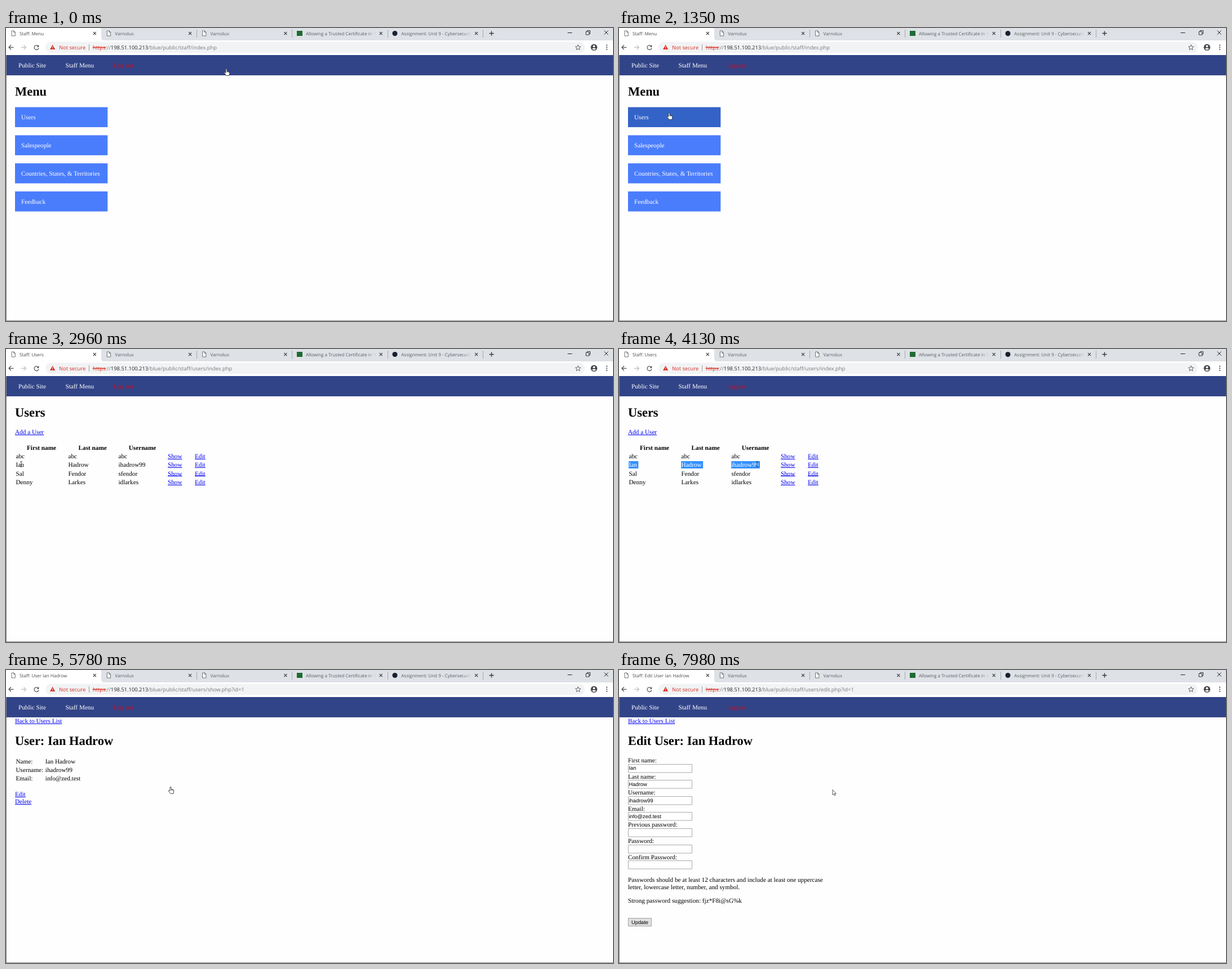
Recreate the animation shown at these times as an HTML page with a canvas. Size 1077 by 520 pixels, loop 8000 ms.

```html
<!DOCTYPE html>
<html lang="en">
<head>
<meta charset="utf-8">
<title>Staff area</title>
<style>
  html, body { margin: 0; width: 100%; height: 100%; overflow: hidden; background: #fff; }
  canvas { display: block; }
</style>
</head>
<body>
<canvas id="stage" width="1077" height="520"></canvas>
<script>
const ctx = document.getElementById('stage').getContext('2d');
ctx.textRendering = 'geometricPrecision';

const LOOP = 8000;
const SERIF = '11.22px "Liberation Serif", serif';
const BOLD = 'bold ' + SERIF;
const HEADING = 'bold 22.44px "Liberation Serif", serif';
const FIELD = '9.35px "Liberation Sans", sans-serif';
const TAB = '8.05px "Open Sans", sans-serif';
const ADDRESS = '9.35px "Open Sans", sans-serif';
const LINK = '#0000ee', STRIP = '#dee1e6', SELECTION = '#3390ff';

const FIRST = 'Ian', LAST = 'Hadrow', LOGIN = 'ihadrow99', MAIL = 'info@zed.test';
const FULL = `${FIRST} ${LAST}`;

// ---------- drawing helpers ----------
function box(x, y, w, h, color) {
  ctx.fillStyle = color;
  ctx.fillRect(x, y, w, h);
}

function text(str, x, y, { font = SERIF, color = '#000', align = 'left' } = {}) {
  ctx.font = font;
  ctx.fillStyle = color;
  ctx.textAlign = align;
  ctx.fillText(str, x, y);
  return ctx.measureText(str).width;
}

function link(str, x, y, color = LINK) {
  const width = text(str, x, y, { color });
  box(x, Math.round(y + 0.7), width, 1, LINK);
}

function shape(d, x, y, { stroke, fill, width = 1 }) {
  const path = new Path2D(d);
  ctx.save();
  ctx.translate(x, y);
  ctx.lineJoin = 'round';
  if (fill) { ctx.fillStyle = fill; ctx.fill(path); }
  if (stroke) { ctx.strokeStyle = stroke; ctx.lineWidth = width; ctx.stroke(path); }
  ctx.restore();
}

function disc(x, y, r, color) {
  ctx.fillStyle = color;
  ctx.beginPath();
  ctx.arc(x, y, r, 0, 7);
  ctx.fill();
}

const cross = r => `M${-r},${-r}L${r},${r}M${r},${-r}L${-r},${r}`;

// ---------- browser window ----------
function fileIcon(x) {
  shape('M-3,-4.5H1L3.3,-2V4.5H-3ZM.8,-4.5V-1.8H3.3', x, 9.5, { stroke: '#5f6368', fill: '#fff', width: 0.9 });
}

function fade(x) {
  const gradient = ctx.createLinearGradient(x - 16, 0, x, 0);
  gradient.addColorStop(0, STRIP + '00');
  gradient.addColorStop(1, STRIP);
  box(x - 16, 2, 40, 16, gradient);
}

function drawTabs(title, loading) {
  box(0, 0, 1077, 22, STRIP);
  shape('M0,0H167Q169,0 169,3V17Q169,22 174,22H0Z', 0, 0, { fill: '#fff' });
  const titles = [title, 'Varnolux', 'Varnolux', 'Allowing a Trusted Certificate in Yo', 'Assignment: Unit 9 - Cybersecurity'];
  titles.forEach((label, i) => {
    const x = i * 169.3;
    text(label, x + 24, 12.5, { font: TAB, color: i ? '#5a5e63' : '#45494d' });
    if (i > 2) fade(x + 149);
    shape(cross(2.5), x + 157.3, 9.5, { stroke: '#45494d', width: 1.1 });
    if (i) box(Math.round(x + 168.6), 3, 1, 14, '#a5a8ad');
    if (i < 3 && !(loading && i === 0)) fileIcon(x + 13);
  });
  if (loading) box(12, 5, 2, 1, '#777');
  box(516, 5, 10, 9, '#1d6b34');
  disc(690, 9.5, 4.5, '#17212f');
  shape('M-4,0H4M0,-4V4', 861.5, 9.5, { stroke: '#333', width: 1.3 });
  shape('M-4,0H4', 1000.5, 8.5, { stroke: '#222' });
  shape('M-3.5,-1.5H2V4H-3.5ZM-1.5,-1.5V-3.5H4V2H2', 1032.5, 8, { stroke: '#222', width: 0.9 });
  shape(cross(3.5), 1065, 8, { stroke: '#222' });
}

function drawToolbar(path, loading) {
  box(0, 22, 1077, 26, '#fff');
  ctx.fillStyle = '#f1f3f4';
  ctx.beginPath();
  ctx.roundRect(70, 24.5, 957, 19.5, 9.7);
  ctx.fill();

  shape('M4.5,0H-4M0,-4L-4,0L0,4', 9, 34.3, { stroke: '#505458', width: 1.3 });
  shape('M-4.5,0H4M0,-4L4,0L0,4', 31.5, 34.3, { stroke: '#b9bcbf', width: 1.2 });
  if (loading) shape(cross(3.8), 54, 34.3, { stroke: '#505458', width: 1.3 });
  else {
    shape('M3.2,-2.2A4,4 0 1 0 4,1', 54, 34.3, { stroke: '#505458', width: 1.2 });
    shape('M4.4,-4.6V-.6H.4Z', 54, 34.3, { fill: '#505458' });
  }

  shape('M0,-4.2L4.6,4H-4.6Z', 82.6, 34, { fill: '#d93025' });
  shape('M0,-1.5V1.3M0,2V3', 82.6, 34, { stroke: '#fff', width: 0.9 });
  text('Not secure', 94, 37.9, { font: ADDRESS, color: '#d93025' });
  box(147, 29, 1, 11, '#a09a9b');
  let x = 154;
  const parts = [['https', '#d93025'], ['://', '#777b80'], ['198.51.100.213', '#25282c'], [path, '#777b80']];
  for (const [part, color] of parts) x += text(part, x, 37.9, { font: ADDRESS, color });
  box(153.5, 34, 24, 1, '#d93025');

  shape('M0,-4.8L1.3,-1.6L4.7,-1.4L2.1,.8L3,4.2L0,2.3L-3,4.2L-2.1,.8L-4.7,-1.4L-1.3,-1.6Z', 1015, 34.5, { stroke: '#505458', width: 0.9 });
  disc(1043.3, 34.3, 5.8, '#45494d');
  disc(1043.3, 32.3, 1.9, '#fff');
  shape('M-3.5,2.7Q0,-.2 3.5,2.7Q0,6 -3.5,2.7Z', 1043.3, 34.3, { fill: '#fff' });
  for (const dy of [-3.6, 0, 3.6]) disc(1066, 34.3 + dy, 1.1, '#505458');
}

function drawFrame(page, loading) {
  box(0, 48, 1077, 472, '#fefefe');
  drawTabs(page.title, loading);
  drawToolbar('/blue/public/staff/' + page.path, loading);
  box(0, 48, 1077, 36, '#324488');
  text('Public Site', 22, 70.3, { color: '#fff' });
  text('Staff Menu', 105.5, 70.3, { color: '#fff' });
  text('Log out', 191, 70.3, { color: '#d5061c' });
  box(0, 48, 1, 472, '#858585');
  box(0, 519, 1077, 1, '#858585');
}

// ---------- pages ----------
function drawMenu(t) {
  text('Menu', 16, 119.6, { font: HEADING });
  ['Users', 'Salespeople', 'Countries, States, & Territories', 'Feedback'].forEach((label, i) => {
    const y = 140.5 + i * 49.85;
    box(16, y, 164.3, 35.5, i === 0 && t >= 1350 ? '#3463c8' : '#4a7dfc');
    text(label, 27, y + 21.5, { color: '#fff' });
  });
}

const COLUMNS = [17.5, 110.5, 199.5, 287, 335];
const USERS = [
  ['abc', 'abc', 'abc'],
  [FIRST, LAST, LOGIN],
  ['Sal', 'Fendor', 'sfendor'],
  ['Denny', 'Larkes', 'idlarkes'],
];

function isSelected(row, col, t) {
  if (row === 0 || t < 3540 || t >= 4830) return false;
  if (t >= 4680) return true;
  return row === 1 && cursorAt(t).x > COLUMNS[col] + 9;
}

function drawUsers(t) {
  text('Users', 16, 119.6, { font: HEADING });
  link('Add a User', 16, 151);
  ['First name', 'Last name', 'Username'].forEach((label, i) =>
    text(label, [63, 153.7, 242][i], 178.6, { font: BOLD, align: 'center' }));
  USERS.forEach((user, row) => [...user, 'Show', 'Edit'].forEach((value, col) => {
    const x = COLUMNS[col], y = 193.9 + row * 15.4;
    const selected = isSelected(row, col, t);
    if (selected) {
      ctx.font = SERIF;
      const lineEnd = row === 3 && col === 4 ? 0 : 2.8;
      box(x - 0.3, Math.round(y - 10.2), ctx.measureText(value).width + lineEnd, 13, SELECTION);
    }
    if (col > 2) link(value, x, y, selected ? '#fff' : LINK);
    else text(value, x, y, { color: selected ? '#fff' : '#000' });
  }));
}

function drawShow() {
  link('Back to Users List', 16, 94);
  text('User: ' + FULL, 16, 132.7, { font: HEADING });
  [['Name:', FULL], ['Username:', LOGIN], ['Email:', MAIL]].forEach(([label, value], i) => {
    text(label, 17.5, 165.6 + i * 15.4);
    text(value, 69.8, 165.6 + i * 15.4);
  });
  link('Edit', 16, 224);
  link('Delete', 16, 237);
}

function drawEdit() {
  link('Back to Users List', 16, 94);
  text('Edit User: ' + FULL, 16, 132.7, { font: HEADING });
  const fields = [['First name:', FIRST], ['Last name:', LAST], ['Username:', LOGIN], ['Email:', MAIL],
    ['Previous password:', ''], ['Password:', ''], ['Confirm Password:', '']];
  fields.forEach(([label, value], i) => {
    const y = 164 + i * 28.6;
    text(label, 16, y);
    shape('M0,0H113V14.5H0Z', 16.5, Math.round(y + 2.5) + 0.5, { stroke: '#aaa', fill: '#fff' });
    text(value, 17.5, y + 13.4, { font: FIELD });
  });
  text('Passwords should be at least 12 characters and include at least one uppercase', 16, 375.8);
  text('letter, lowercase letter, number, and symbol.', 16, 388.6);
  text('Strong password suggestion: fjz*F8i@sG%k', 16, 413);
  shape('M0,0H41V14H0Z', 16.5, 440.5, { stroke: '#a2a2a2', fill: '#e0e0e0' });
  text('Update', 37, 450.6, { font: FIELD, align: 'center' });
}

const PAGES = [
  { from: 0, title: 'Staff: Menu', path: 'index.php', draw: drawMenu },
  { from: 1630, title: 'Staff: Users', path: 'users/index.php', draw: drawUsers },
  { from: 5780, title: 'Staff: User ' + FULL, path: 'users/show.php?id=1', draw: drawShow },
  { from: 7680, title: 'Staff: Edit User ' + FULL, path: 'users/edit.php?id=1', draw: drawEdit },
];

// ---------- pointer ----------
// Each move: start, end, number of jumps, target x, y, look on the way, look on arrival.
const MOVES = [
  [140, 660, 5, 2, 194, 'arrow', 'arrow'],
  [790, 1050, 3, 89, 150, 'arrow', 'hand'],
  [1630, 2560, 8, 88, 215, 'hand', 'arrow'],
  [2710, 2960, 3, 27, 204.5, 'arrow', 'beam'],
  [3110, 3260, 2, 20.5, 205, 'beam', 'beam'],
  [3540, 4550, 8, 349, 204, 'beam', 'arrow'],
  [4680, 4680, 1, 380.5, 209.5, 'arrow', 'arrow'],
  [4830, 5100, 3, 290, 212, 'arrow', 'arrow'],
  [5370, 5370, 1, 292, 207, 'hand', 'hand'],
  [6180, 6330, 2, 162, 235, 'arrow', 'arrow'],
  [6710, 7100, 4, 24, 215, 'arrow', 'hand'],
  [7680, 7980, 3, 379, 212.5, 'arrow', 'arrow'],
];

function cursorAt(t) {
  let x = 391, y = 72, look = 'hand';
  for (const [start, end, jumps, toX, toY, moving, arrived] of MOVES) {
    if (t < start) break;
    const done = t >= end ? jumps : Math.floor((t - start) / (end - start) * (jumps - 1)) + 1;
    const p = done / jumps, eased = p * p * (3 - 2 * p);
    x += (toX - x) * eased;
    y += (toY - y) * eased;
    look = done === jumps ? arrived : moving;
  }
  return { x, y, look };
}

const POINTERS = {
  arrow: ['M0,0V9L2.1,7.1L3.6,10.3L5,9.7L3.6,6.6H6.2Z', { stroke: '#333', fill: '#fff', width: 0.8 }],
  hand: ['M-1.1,1Q0,-.4 1,1V4.6L4.6,5.5Q6,6 5.8,8L5,12.4H0L-3.5,8Q-4,6.6 -2.8,6.5L-1.1,7.8ZM1,4.6V6.5M2.8,5V6.8M4.4,5.4V7',
    { stroke: '#222', fill: '#fff', width: 0.8 }],
  beam: ['M-2,-4.5H2M-2,4.5H2M0,-4.5V4.5', { stroke: '#333', width: 0.9 }],
};

function render() {
  const t = performance.now() % LOOP;
  const page = PAGES.findLast(p => t >= p.from);
  drawFrame(page, t >= 7530 && t < 7680);
  page.draw(t);
  const { x, y, look } = cursorAt(t);
  const [path, style] = POINTERS[look];
  shape(path, x, y, style);
  requestAnimationFrame(render);
}
render();
</script>
</body>
</html>
```
